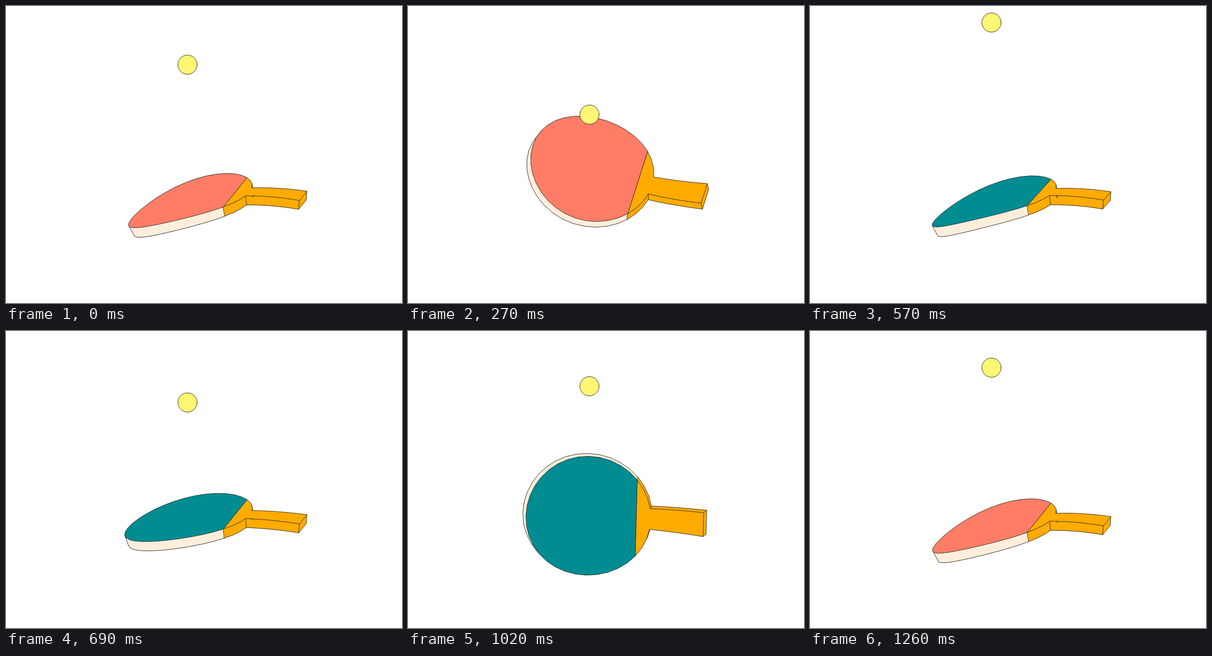
Animation of 864x648 px, one loop 1290 ms. Source, as an HTML page:

```html
<!DOCTYPE html>
<html lang="en">
<head>
<meta charset="utf-8">
<title>Paddle and ball</title>
<style>
html, body { margin: 0; width: 100%; height: 100%; overflow: hidden; background: #fff; }
svg { display: block; width: 100%; height: 100%; }
path, circle { stroke: #222; stroke-width: 1; stroke-linejoin: round; stroke-linecap: round; }
#grip, #wood { fill: #ffab00; }
#edge { fill: #fdeedc; }
#grip { stroke: #ffab00; stroke-width: .6; }
#edge { stroke: #fdeedc; stroke-width: .6; }
#lines { fill: none; }
#ball { fill: #fff673; }
</style>
</head>
<body>
<svg viewBox="0 0 864 648">
  <path id="grip"/><path id="edge"/><path id="lines"/>
  <path id="wood"/><path id="rubber"/>
  <circle id="ball" cx="396" cy="128" r="21"/>
</svg>
<script>
const STEP = 30, STEPS = 43, HALF = 21.4;
const RED = '#ff7d66', TEAL = '#008c91';
const LENGTH = 387, DEPTH = 10.5, ROLL = 0.12, FLEX = 0.07;
const el = id => document.getElementById(id);

// Keys are [step, value, slope per step].
const BALL = [
  [2.7, 333, 0], [9, 237, -26], [15, 76, -19], [19.1, 36, 0],
  [19.3, 36, 0], [23, 156, 65], [25.1, 333, 100],
  [25.1, 333, 0], [30, 235, -30], [34, 120.5, -25], [39.9, 36, 0],
  [42, 80, 42], [43, 128, 56], [45.7, 333, 95]
];
const BEND = [[0, -.63, .02], [6, .48, .045], [15, .64, 0], [21.5, .63, 0]];
const LIFT = [[0, 423.8, -1.5], [6, 412.5, 0], [12.8, 420, .5], [21.5, 424.8, 0]];

function curve(keys, t) {
  let i = 0;
  while (i < keys.length - 2 && t >= keys[i + 1][0]) i++;
  const [t0, y0, m0] = keys[i], [t1, y1, m1] = keys[i + 1];
  const w = t1 - t0, x = Math.min(1, Math.max(0, (t - t0) / w)), r = 1 - x;
  return y0 * (1 + 2 * x) * r * r + w * m0 * x * r * r
       + y1 * x * x * (3 - 2 * x) - w * m1 * x * x * r;
}

const ease = x => (1 - Math.cos(Math.PI * Math.min(1, Math.max(0, x)))) / 2;

// Flat outline as [distance from handle end, side offset].
const outline = [];
const GRIP = 6, ARC = 34, CUT = 3;
for (let i = 0; i < GRIP; i++) outline.push([117 * i / GRIP, 27 - 3.5 * i / GRIP]);
for (let i = 0; i <= ARC; i++) {
  const a = (10 + 10 * i) * Math.PI / 180;
  outline.push([251 - 136 * Math.cos(a), 134 * Math.sin(a)]);
}
for (let i = GRIP - 1; i >= 0; i--) outline.push([117 * i / GRIP, -27 + 3.5 * i / GRIP]);

const N = outline.length;
const cutA = GRIP + CUT, cutB = GRIP + ARC - CUT;
const corners = [0, GRIP, cutA, cutB, GRIP + ARC, N - 1];

function pose(f) {
  const first = f < HALF, q = first ? f : f - HALF;
  const turn = (22 + 180 * (ease((f - 4.9) / 15.2) + ease((f - 26.8) / 15.2))) * Math.PI / 180;
  return {
    s: Math.sin(turn), c: Math.cos(turn),
    bend: curve(BEND, q) * (first ? 1 : -1),
    y: curve(LIFT, q)
  };
}

function project(p, [d, v], n) {
  const { s, c, bend } = p;
  const tilt = bend * (d / LENGTH - FLEX), rise = bend * (d / LENGTH / 2 - FLEX) * d;
  const nx = -.25 * s + .13 * c, ny = -c;
  return [
    647.5 - d + tilt * tilt * d / 6 + rise * nx + v * (.285 * c + .1 * s) + n * (nx + tilt),
    p.y - ROLL * d + rise * ny - v * s + n * (ny + ROLL * tilt)
  ];
}

function area(pts) {
  return pts.reduce((sum, a, i) => {
    const b = pts[(i + 1) % pts.length];
    return sum + a[0] * b[1] - a[1] * b[0];
  }, 0);
}

const line = pts => 'M' + pts.map(p => p[0].toFixed(2) + ' ' + p[1].toFixed(2)).join('L');
const closed = pts => line(pts) + 'Z';

function drawPaddle(p) {
  const top = outline.map(o => project(p, o, DEPTH));
  const low = outline.map(o => project(p, o, -DEPTH));
  const red = area(top.slice(cutA, cutB + 1)) < 0;
  const front = red ? top : low, back = red ? low : top;
  const dir = red ? -1 : 1;

  const seen = front.map((a, i) => {
    const b = front[(i + 1) % N], e = back[i];
    return ((b[0] - a[0]) * (e[1] - a[1]) - (b[1] - a[1]) * (e[0] - a[0])) * dir < 0;
  });
  let grip = '', edge = '', lines = '';
  for (let i = 0; i < N; i++) {
    const j = (i + 1) % N, before = seen[(i + N - 1) % N];
    if (seen[i]) {
      const quad = closed([front[i], front[j], back[j], back[i]]);
      if (i >= cutA && i < cutB) edge += quad; else grip += quad;
      lines += line([back[i], back[j]]);
    }
    if (seen[i] !== before || (seen[i] && corners.includes(i))) {
      lines += line([front[i], back[i]]);
    }
  }
  el('grip').setAttribute('d', grip);
  el('edge').setAttribute('d', edge);
  el('lines').setAttribute('d', lines);
  el('wood').setAttribute('d', closed(front.slice(0, cutA + 1).concat(front.slice(cutB))));
  el('rubber').setAttribute('d', closed(front.slice(cutA, cutB + 1)));
  el('rubber').setAttribute('fill', red ? RED : TEAL);
}

function draw(ms) {
  const f = Math.floor(ms / STEP) % STEPS;
  drawPaddle(pose(f));
  el('ball').setAttribute('cy', curve(BALL, f < BALL[0][0] ? f + STEPS : f).toFixed(2));
}

const start = performance.now();
function tick() {
  draw(performance.now() - start);
  requestAnimationFrame(tick);
}
tick();
</script>
</body>
</html>
```
